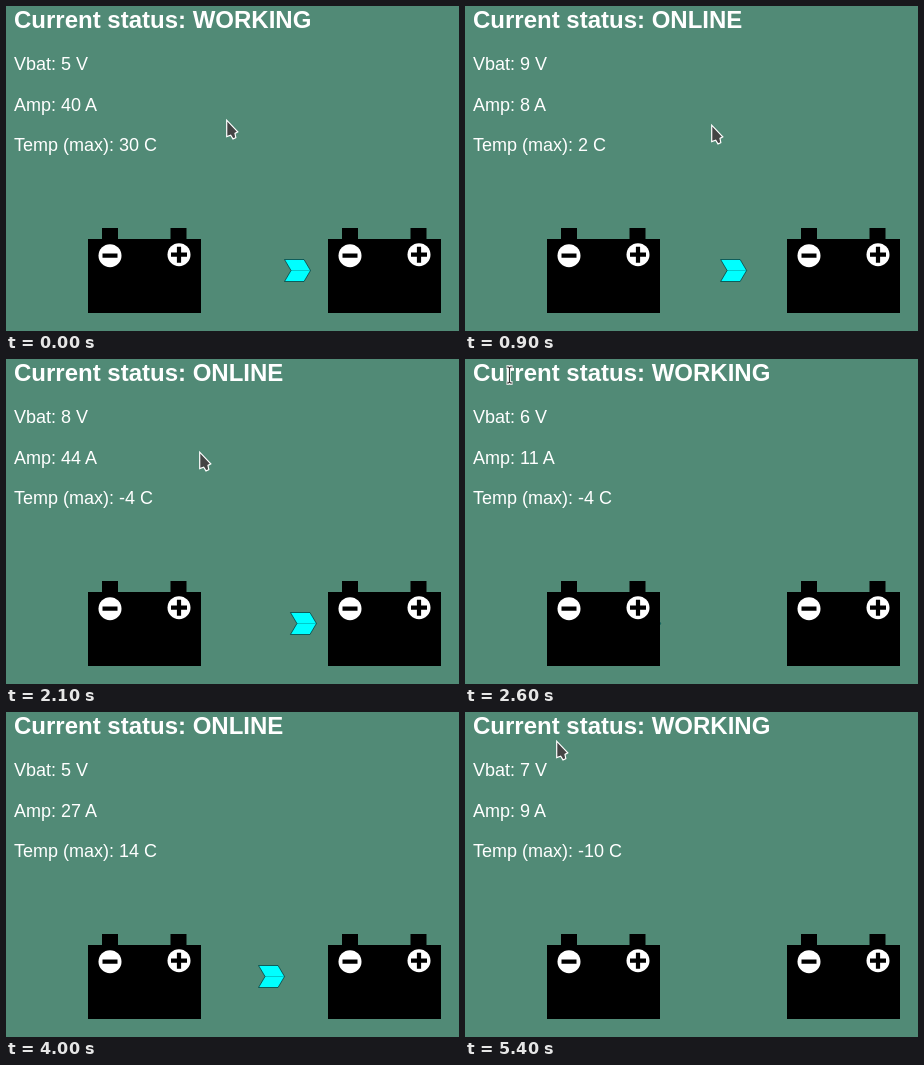
These frames come from a looping animation (453 by 325 pixels, 5.5 s). An HTML page:

```html
<!DOCTYPE html>
<html>
<head>
<meta charset="utf-8">
<title>Battery status</title>
<style>
  html, body { margin: 0; width: 100%; height: 100%; overflow: hidden; background: #518a76; }
  svg { display: block; }
  text { font: 18px "Liberation Sans", Arial, sans-serif; fill: #fff; white-space: pre; }
  #status { font-size: 24px; font-weight: bold; }
</style>
</head>
<body>
<svg width="453" height="325" viewBox="0 0 453 325">
  <defs>
    <g id="battery">
      <path d="M82 233H96V222H112V233H164.5V222H180.5V233H195V307H82Z"/>
      <circle cx="104" cy="249.7" r="11.5" fill="#fff"/>
      <circle cx="173" cy="248.7" r="11.5" fill="#fff"/>
      <path d="M96.5 249.7H111.5M165 248.7H181M173 240.7V256.7" stroke="#000" stroke-width="4.2"/>
    </g>
  </defs>
  <text id="status" x="8" y="22"></text>
  <text id="vbat" x="8" y="64"></text>
  <text id="amp" x="8" y="105"></text>
  <text id="temp" x="8" y="145"></text>
  <g id="arrow" fill="#0ff" stroke="#033" stroke-width=".7">
    <path d="M.5 253.5H20L26.5 264.5 20 275.5H.5L7 264.5Z"/>
    <path d="M7 264.5H26.5" stroke-opacity=".5" stroke-width=".5"/>
  </g>
  <use href="#battery"/>
  <use href="#battery" x="240"/>
  <path id="pointer" d="M.7 1.2V17.6L4.7 16.2 7 19.9 9.8 18.7 9 14.4 11.8 12.8Z" fill="#444" stroke="#fff" stroke-width="1.2"/>
  <g id="beam" fill="none">
    <path id="bar" d="M-3 -8H-1L0 -7 1 -8H3M0 -7V7M-3 8H-1L0 7 1 8H3" stroke="#fff" stroke-width="3"/>
    <use href="#bar"/>
    <path d="M-3 -8H-1L0 -7 1 -8H3M0 -7V7M-3 8H-1L0 7 1 8H3" stroke="#333" stroke-width="1.2"/>
  </g>
</svg>
<script>
const LOOP = 5500, STEP = 100;
const $ = id => document.getElementById(id);

// time, status, volts, amps, temperature
const readings = [
  [0, "WORKING", 5, 40, 30],
  [400, "ONLINE", 9, 8, 2],
  [1400, "ONLINE", 8, 44, -4],
  [2400, "WORKING", 6, 11, -4],
  [3500, "ONLINE", 5, 27, 14],
  [4500, "WORKING", 7, 9, -10]
];

// moments at which the arrow tip leaves the left battery
const passes = [-500, 504, 1573, 2595, 3618, 4701];
const SPEED = 0.22;

// time, x, y of the mouse
const mouse = [
  [0, 220, 113], [400, 237, 118], [500, 237, 118], [900, 246, 118],
  [1600, 258, 119], [1900, 248, 115], [2300, 137, 69], [2400, 90, 42],
  [2500, 90, 42], [2600, 44, 16], [2700, 30, 8]
];

function mouseAt(t) {
  if (t >= 5400) return [91, 28];
  const i = mouse.findIndex(k => k[0] >= t);
  if (i < 0) return null;
  const b = mouse[i], a = mouse[Math.max(i - 1, 0)];
  const p = (t - a[0]) / (b[0] - a[0] || 1);
  return [1, 2].map(n => Math.round(a[n] + (b[n] - a[n]) * p));
}

function place(el, x, y, shown) {
  el.setAttribute("transform", `translate(${x} ${y})`);
  el.style.display = shown ? "" : "none";
}

function draw(now) {
  const t = Math.floor(now % LOOP / STEP) * STEP;

  const [, status, volts, amps, temp] = readings.findLast(r => r[0] <= t);
  $("status").textContent = "Current status: " + status;
  $("vbat").textContent = `Vbat: ${volts} V`;
  $("amp").textContent = `Amp: ${amps} A`;
  $("temp").textContent = `Temp (max): ${temp} C`;

  const x = 168 + SPEED * (t - passes.findLast(p => p <= t));
  place($("arrow"), x, 0, x < 321.5);

  const m = mouseAt(t), [mx, my] = m || [0, 0];
  const overText = t >= 2600 && t < 5400;
  place($("pointer"), mx, my, m && !overText);
  place($("beam"), mx + 0.5, my, m && overText);

  requestAnimationFrame(draw);
}
draw(0);
</script>
</body>
</html>
```
